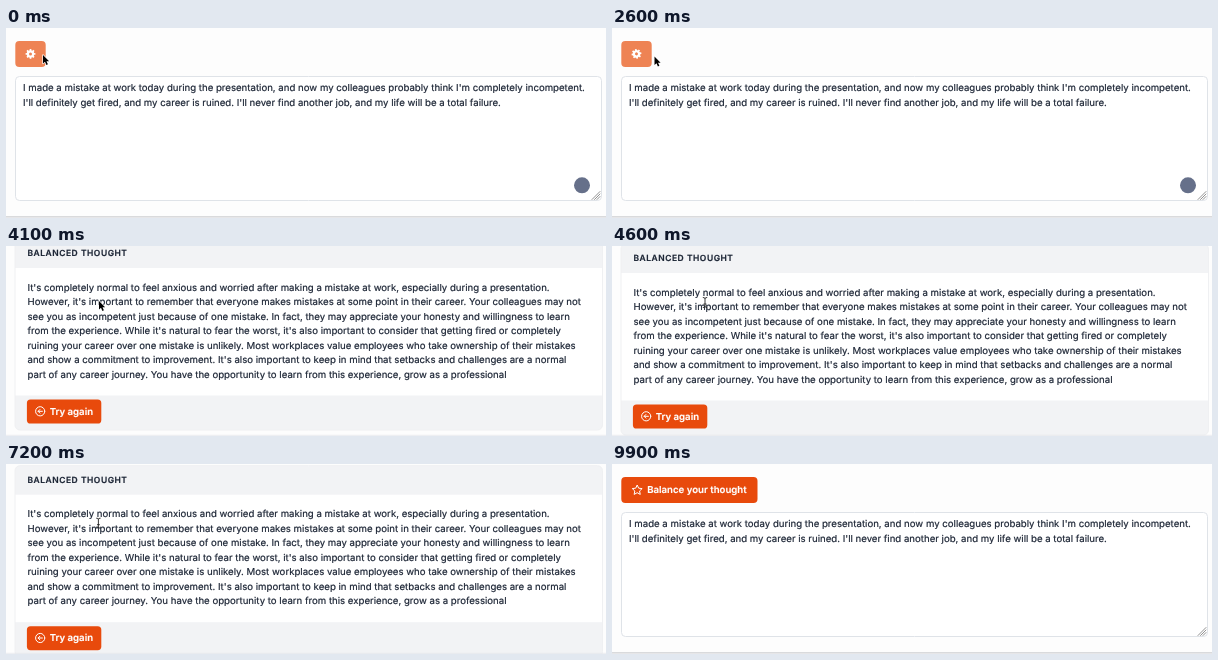
These frames come from a looping animation (600 by 190 pixels, 10000 ms). An HTML page with a canvas:

```html
<!DOCTYPE html>
<html lang="en">
<head>
<meta charset="utf-8">
<title>Balanced thought</title>
<style>
html, body { margin: 0; width: 100%; height: 100%; overflow: hidden; background: #fdfdfd; }
canvas { display: block; width: 600px; height: 190px; }
</style>
</head>
<body>
<canvas id="stage"></canvas>
<script>
const W = 600, H = 190, LOOP = 10000, STEP = 100;
const SHOW_RESULT = 2800, SHOW_FORM = 9300, RESET = 9800;
const FONT = 'Inter, "Open Sans", sans-serif';
const SIZE = 9.65, LEADING = 14.5;
const INK = '#1b2434', ORANGE = '#e84a0c', HOVER = '#ad360b', BUSY = '#ee8354';
const BAND = '#f2f3f5', EDGE = '#e4e7eb', PAGE = '#fdfdfd';

const THOUGHT = [
  "I made a mistake at work today during the presentation, and now my colleagues probably think I'm completely incompetent.",
  "I'll definitely get fired, and my career is ruined. I'll never find another job, and my life will be a total failure."
];
const ANSWER = [
  "It's completely normal to feel anxious and worried after making a mistake at work, especially during a presentation.",
  "However, it's important to remember that everyone makes mistakes at some point in their career. Your colleagues may not",
  "see you as incompetent just because of one mistake. In fact, they may appreciate your honesty and willingness to learn",
  "from the experience. While it's natural to fear the worst, it's also important to consider that getting fired or completely",
  "ruining your career over one mistake is unlikely. Most workplaces value employees who take ownership of their mistakes",
  "and show a commitment to improvement. It's also important to keep in mind that setbacks and challenges are a normal",
  "part of any career journey. You have the opportunity to learn from this experience, grow as a professional"
];

// Each key is [time, value, ...]; values ease from one key to the next.
const SCROLL = [[3500, 25], [3700, 24], [4100, 7], [4300, 6.2], [4600, 12], [5200, 15.7]];
const POINTER = [
  [0, 37, 27], [1100, 42.5, 28.5], [2700, 42.5, 28.5], [3300, 93, 55],
  [3700, 93, 55], [4100, 93, 55], [4600, 93, 56.5], [7000, 93, 56.5],
  [7700, 90, 70], [8000, 90, 70], [8400, 69, 162.5], [9200, 69, 162.5], [9600, 72, 205]
];

const canvas = document.getElementById('stage');
const ctx = canvas.getContext('2d');
const dpr = window.devicePixelRatio || 1;
canvas.width = W * dpr;
canvas.height = H * dpr;

function track(keys, t) {
  let a = keys[0];
  for (const b of keys) {
    if (t < b[0]) {
      const p = Math.max(0, (t - a[0]) / (b[0] - a[0]));
      const e = p * p * (3 - 2 * p);
      return a.slice(1).map((v, i) => v + (b[i + 1] - v) * e);
    }
    a = b;
  }
  return a.slice(1);
}

// A hairline stroke gives the slightly heavy look of smoothed screen text.
function text(str, x, y, { size = SIZE, weight = 400, color = INK, spacing = 0 } = {}) {
  ctx.font = `${weight} ${size}px ${FONT}`;
  ctx.letterSpacing = spacing + 'px';
  ctx.fillStyle = ctx.strokeStyle = color;
  ctx.lineWidth = 0.18;
  ctx.fillText(str, x, y);
  ctx.strokeText(str, x, y);
}

function lines(list, x, y) {
  list.forEach((line, i) => text(line, x, y + i * LEADING));
}

function box(x, y, w, h, r, fill, stroke) {
  ctx.beginPath();
  ctx.roundRect(x, y, w, h, r);
  if (fill) { ctx.fillStyle = fill; ctx.fill(); }
  if (stroke) { ctx.strokeStyle = stroke; ctx.lineWidth = 1; ctx.stroke(); }
}

function shape(path, x, y, fill, stroke, width) {
  ctx.save();
  ctx.translate(x, y);
  ctx.lineJoin = ctx.lineCap = 'round';
  const p = new Path2D(path);
  if (stroke) { ctx.strokeStyle = stroke; ctx.lineWidth = width; ctx.stroke(p); }
  if (fill) { ctx.fillStyle = fill; ctx.fill(p); }
  ctx.restore();
}

function disc(x, y, r, color) {
  ctx.fillStyle = color;
  ctx.beginPath();
  ctx.arc(x, y, r, 0, Math.PI * 2);
  ctx.fill();
}

function gear(x, y, angle) {
  ctx.save();
  ctx.translate(x, y);
  ctx.rotate(angle);
  disc(0, 0, 3.7, '#fff');
  for (let i = 0; i < 8; i++) {
    ctx.rotate(Math.PI / 4);
    ctx.fillRect(-0.85, -4.9, 1.7, 2);
  }
  disc(0, 0, 1.5, BUSY);
  ctx.restore();
}

function star(x, y) {
  ctx.beginPath();
  for (let i = 0; i < 10; i++) {
    const a = i * Math.PI / 5 - Math.PI / 2, r = i % 2 ? 2.5 : 5.2;
    ctx.lineTo(x + r * Math.cos(a), y + r * Math.sin(a));
  }
  ctx.closePath();
  ctx.lineJoin = 'round';
  ctx.lineWidth = 1;
  ctx.strokeStyle = '#fff';
  ctx.stroke();
}

function form(t) {
  const idle = t >= RESET;
  if (idle) {
    box(9.3, 13, 136.2, 26, 4, ORANGE);
    star(25.2, 26.2);
    text('Balance your thought', 35.2, 29.4, { weight: 600, color: '#fff' });
  } else {
    box(9.3, 13, 30.4, 26, 4, BUSY);
    gear(24.5, 25.9, t / 1000 * Math.PI * 2);
  }
  box(9.5, 48.5, 586, 124, 4, '#fff', '#dfe3e8');
  lines(THOUGHT, 17, 63);
  if (!idle) disc(576, 157.3, 8, '#66708a');
  for (const d of [8, 5.5, 3]) {
    shape(`M${-d} 0L0 ${-d}`, 594, 171.5, null, '#777', 0.8);
  }
  ctx.fillStyle = '#c2c4c7';
  ctx.fillRect(0, 188.4, W, 1);
}

function result(t) {
  const y = track(SCROLL, t)[0];
  const top = y - 14;
  ctx.save();
  ctx.beginPath();
  ctx.roundRect(9, top, 587.5, 191, 5);
  ctx.clip();
  ctx.fillStyle = '#fff';
  ctx.fillRect(8, top, 590, 191);
  ctx.fillStyle = BAND;
  ctx.fillRect(8, top, 590, 29);
  ctx.fillRect(8, y + 142.5, 590, 49);
  ctx.restore();
  box(9, top, 587.5, 191, 5, null, '#eff0f2');

  text('BALANCED THOUGHT', 21.5, y + 3.1, { size: 8.45, weight: 600, spacing: 0.54 });
  lines(ANSWER, 21.5, y + 37.6);

  const hover = t >= 8400;
  box(20.9, y + 146.5, 74.4, 24, 3.6, hover ? HOVER : ORANGE);
  const cy = y + 158.3;
  shape('M4.6 0A4.6 4.6 0 1 1 -4.6 0A4.6 4.6 0 1 1 4.6 0M2.2 0H-2M-.3 -1.8L-2.1 0L-.3 1.8',
    34.2, cy, null, '#fff', 1);
  text('Try again', 43.7, cy + 3.4, { weight: 600, color: '#fff' });
  ctx.fillStyle = EDGE;
  ctx.fillRect(0, 188.8, W, 0.8);
}

const arrow = (x, y) =>
  shape('M0 0V8.6L2 6.8L3.4 10L4.9 9.3L3.5 6.2H6.1Z', x, y, '#000', '#fff', 1.3);

const beam = (x, y) =>
  shape('M-1.8 -5Q0 -5 0 -4Q0 -5 1.8 -5M0 -4V4M-1.8 5Q0 5 0 4Q0 5 1.8 5M-1 1.5H1', x, y, null, '#222', 0.9);

const hand = (x, y) =>
  shape('M-.9 .8Q0 -.5 .9 .8V3.4Q1.7 2.7 2.4 3.5Q3.2 3 3.8 3.9Q4.8 3.7 5 4.8V6.8L4 9.3H0L-2.5 6Q-2.7 4.8 -1.5 5.1L-.9 5.7Z',
    x, y, '#fff', '#222', 1);

function pointer(t) {
  if (t >= RESET) return;
  const [x, y] = track(POINTER, t);
  const scrolling = t >= 3800 && t < 4600;
  if (t < SHOW_RESULT || scrolling || t >= SHOW_FORM) arrow(x, y);
  else if (t >= 8400) hand(x, y);
  else beam(x, y);
}

function draw(t) {
  ctx.setTransform(dpr, 0, 0, dpr, 0, 0);
  ctx.textRendering = 'geometricPrecision';
  ctx.fillStyle = PAGE;
  ctx.fillRect(0, 0, W, H);
  if (t >= SHOW_RESULT && t < SHOW_FORM) result(t);
  else form(t);
  pointer(t);
}

const start = performance.now();
function tick() {
  const t = (performance.now() - start) % LOOP;
  draw(Math.floor(t / STEP) * STEP);
  requestAnimationFrame(tick);
}
tick();
</script>
</body>
</html>
```
